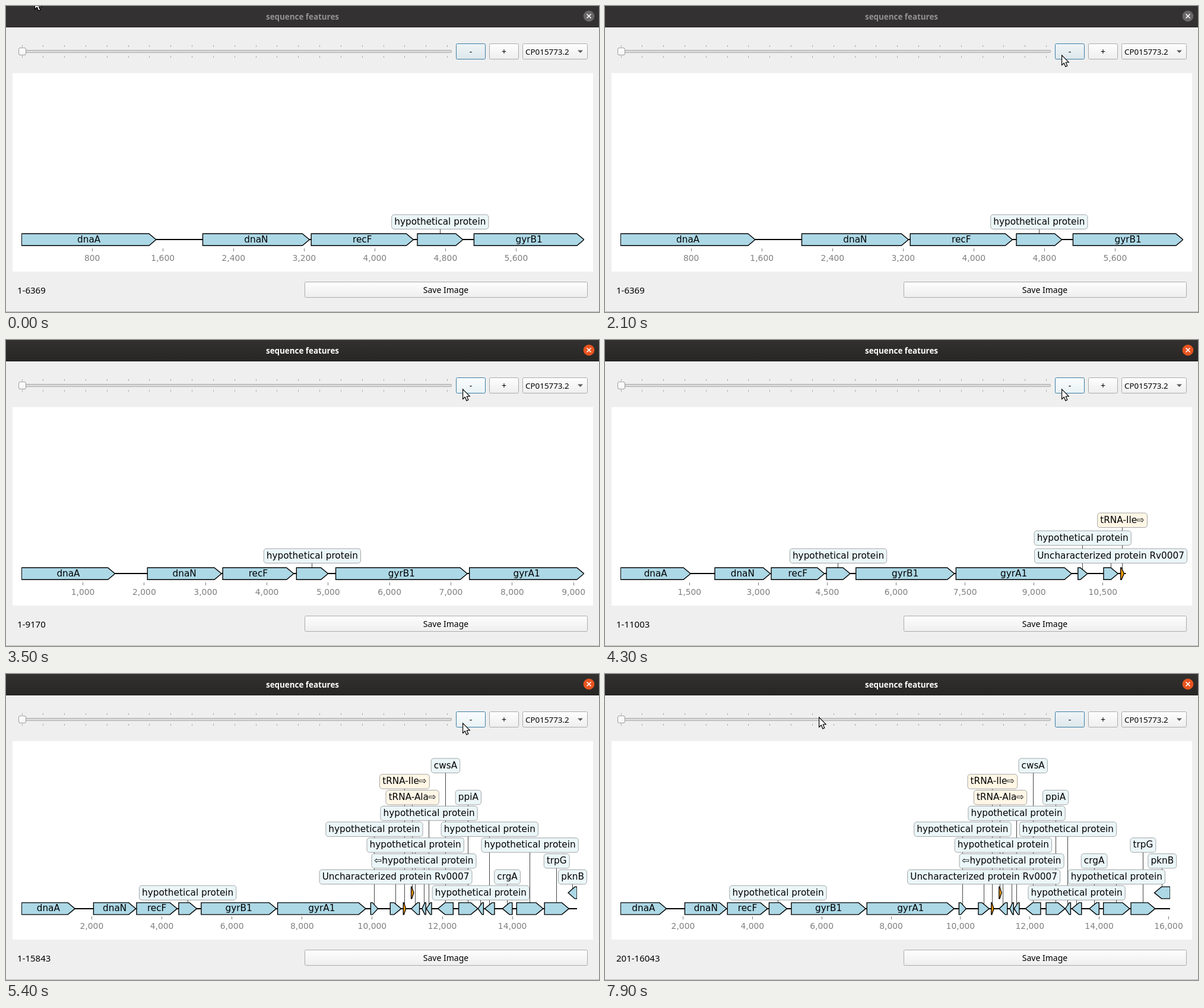
An HTML page with a canvas that plays this animation: 999 px wide and 515 px high, repeating every 8000 ms.

```html
<!DOCTYPE html>
<html lang="en">
<head>
<meta charset="utf-8">
<title>sequence features</title>
<style>
html, body { margin: 0; width: 100%; height: 100%; overflow: hidden; background: #efefef; }
canvas { display: block; }
</style>
</head>
<body>
<canvas id="stage" width="999" height="515"></canvas>
<script>
const ctx = document.getElementById('stage').getContext('2d');
const LOOP = 8000, TICK = 100;
const UI = '"Noto Sans", "Open Sans", sans-serif';
const PLOT = '"DejaVu Sans", sans-serif';
const LEFT = 26.3;
const HYPO = 'hypothetical protein';
const BLUE = { fill: '#add8e6', label: '#ebf6f9' };
const ORANGE = { fill: '#ffa500', label: '#fff6e6' };

// name, first base, last base, strand, lane
const genes = [
  ['dnaA', 1, 1524, 1],
  ['dnaN', 2052, 3260, 1],
  ['recF', 3280, 4437, 1],
  [HYPO, 4482, 4997, 1],
  ['gyrB1', 5123, 7267, 1],
  ['gyrA1', 7302, 9818, 1],
  [HYPO, 9957, 10163, 1],
  ['Uncharacterized protein Rv0007', 10515, 10828, 1],
  ['tRNA-Ile⇨', 10887, 10960, 1],
  ['tRNA-Ala⇨', 11112, 11184, 1, 1],
  [HYPO, 11115, 11350, -1],
  ['⇦' + HYPO, 11420, 11530, -1],
  [HYPO, 11545, 11695, -1],
  ['cwsA', 11874, 12311, -1],
  ['ppiA', 12468, 13016, 1],
  [HYPO, 13020, 13175, -1],
  [HYPO, 13210, 13490, -1],
  ['crgA', 13714, 13995, -1],
  [HYPO, 14120, 14877, 1],
  ['trpG', 14914, 15612, 1],
  ['pknB', 15590, 17470, -1, 1]
];

// rows: label height of each gene, 0 puts the name inside the arrow
const views = [
  { at: 0, from: 1, to: 6369, right: 973.8, base: 393.2, step: 30, rows: '00010' },
  { at: 2900, from: 1, to: 7642, right: 973.7, base: 393.2, step: 30, rows: '000101' },
  { at: 3500, from: 1, to: 9170, right: 973.7, base: 393.2, step: 30, rows: '000100' },
  { at: 4300, from: 1, to: 11003, right: 877.7, base: 393.2, step: 30, rows: '000100213' },
  { at: 4900, from: 1, to: 13203, right: 903.6, base: 393.8, step: 29.6, rows: '0001006287534671' },
  { at: 5400, from: 1, to: 15843, right: 962, base: 394.9, step: 26.75, rows: '000100528743697152432' },
  { at: 7900, from: 201, to: 16043, right: 952, base: 394.9, step: 26.75, rows: '000100528743697513243' }
];

// time, x, y of the pointer tip
const path = [
  [100, 48, -12], [300, 60, 22], [500, 81, 64], [600, 85, 70],
  [1000, 85, 70], [1300, 516, 84], [1400, 610, 87], [1600, 712, 86],
  [1900, 759, 82], [2000, 766, 82], [2100, 769, 82],
  [6900, 769, 82], [7000, 720, 76], [7200, 450, 67], [7300, 370, 65],
  [7400, 370, 65], [7500, 364, 68], [7600, 360, 72]
];
const presses = [2700, 3300, 4700];

function pointerAt(t) {
  if (t <= path[0][0]) return path[0].slice(1);
  const i = path.findIndex(p => p[0] > t);
  if (i < 0) return path[path.length - 1].slice(1);
  const [t0, x0, y0] = path[i - 1], [t1, x1, y1] = path[i];
  const k = (t - t0) / (t1 - t0);
  return [Math.round(x0 + (x1 - x0) * k), Math.round(y0 + (y1 - y0) * k)];
}

function rect(x, y, w, h, color) {
  ctx.fillStyle = color;
  ctx.fillRect(x, y, w, h);
}

function text(str, x, y, font, color = '#000', align = 'center') {
  ctx.font = font;
  ctx.fillStyle = color;
  ctx.textAlign = align;
  ctx.fillText(str, x, y);
}

function polygon(points) {
  ctx.beginPath();
  points.forEach(([x, y]) => ctx.lineTo(x, y));
  ctx.closePath();
}

function vertical(y0, y1, c0, c1) {
  const g = ctx.createLinearGradient(0, y0, 0, y1);
  g.addColorStop(0, c0);
  g.addColorStop(1, c1);
  return g;
}

function panel(x, y, w, h, r, fill, edge, line = 1) {
  ctx.beginPath();
  ctx.roundRect(x, y, w, h, r);
  ctx.fillStyle = fill;
  ctx.fill();
  ctx.strokeStyle = edge;
  ctx.lineWidth = line;
  ctx.stroke();
}

function button(x, y, w, top = '#fefefe', bottom = '#eeeeee', edge = '#ababab') {
  panel(x + .5, y + .5, w - 1, 26, 2, vertical(y, y + 27, top, bottom), edge);
}

function drawTitle(active) {
  rect(0, 0, 999, 36, active ? vertical(0, 36, '#33312f', '#272624') : '#333132');
  rect(0, 35, 999, 1, active ? '#1c1b1a' : '#292728');
  text('sequence features', 499.5, 23, `bold 13.4px ${UI}`, active ? '#fff' : '#949292');
  ctx.beginPath();
  ctx.arc(982, 17, 9.3, 0, 7);
  ctx.fillStyle = active ? '#e95420' : '#696767';
  ctx.fill();
  ctx.beginPath();
  for (const s of [-1, 1]) {
    ctx.moveTo(978.5, 17 - 3.5 * s);
    ctx.lineTo(985.5, 17 + 3.5 * s);
  }
  ctx.strokeStyle = '#fff';
  ctx.lineWidth = 1.6;
  ctx.stroke();
}

function drawSlider() {
  for (let i = 0; i <= 20; i++) {
    const x = Math.floor(27 + i * 35.83);
    rect(x, 66, 1, 3, '#a8a8a8');
    rect(x, 84, 1, 3, '#a8a8a8');
  }
  panel(21.5, 74.5, 729, 4, 1.5, vertical(74, 79, '#cfcfcf', '#e2e2e2'), '#acacac');
  panel(21.5, 70.5, 12, 12, 2.5, vertical(70, 83, '#ffffff', '#f3f3f3'), '#9c9c9c');
}

function drawControls(t) {
  const pressed = presses.some(p => t >= p && t < p + TICK);
  const hover = t >= 2700 && t < 7000;
  const [top, bottom] = pressed ? ['#d3dee3', '#d3dee3']
    : hover ? ['#fbfdfe', '#e8f1f4'] : ['#f0f5f7', '#dce7eb'];
  button(758, 63, 50, top, bottom, '#3c7ea5');
  button(814, 63, 50);
  button(870, 63, 110);
  button(503, 464, 477);
  text('-', 783, 82, `14px ${UI}`);
  text('+', 839, 82, `14px ${UI}`);
  text('CP015773.2', 875, 82, `13.4px ${UI}`, '#000', 'left');
  text('Save Image', 741, 483, `14px ${UI}`);
  polygon([[963, 74.5], [972, 74.5], [967.5, 79]]);
  ctx.fillStyle = '#5a5a5a';
  ctx.fill();
}

// a round step giving at most ten intervals
function tickStep(span) {
  const power = 10 ** Math.floor(Math.log10(span / 10));
  return power * [1, 1.5, 2, 2.5, 3, 4, 5, 6, 8, 10].find(m => span / (m * power) <= 10);
}

function arrow(x0, x1, y, strand, fill) {
  const h = 10, head = Math.min(12, (x1 - x0) * .75);
  const [tail, tip] = strand > 0 ? [x0, x1] : [x1, x0];
  const neck = tip - strand * head;
  polygon([[tail, y - h], [neck, y - h], [tip, y], [neck, y + h], [tail, y + h]]);
  ctx.fillStyle = fill;
  ctx.fill();
  ctx.strokeStyle = '#000';
  ctx.lineWidth = 1.39;
  ctx.stroke();
}

function drawPlot(v) {
  const scale = (v.right - LEFT) / (v.to - v.from);
  const toX = bp => LEFT + (bp - v.from) * scale;
  const step = tickStep(v.to - v.from);
  const font = `15.28px ${PLOT}`;

  rect(11, 113, 978, 334, '#fff');
  for (let bp = step; bp <= v.to; bp += step) {
    const x = toX(bp);
    rect(Math.floor(x), 408, 1, 5, '#808080');
    text(bp.toLocaleString('en-US'), x, 429, `13.89px ${PLOT}`, '#808080');
  }

  const items = [...v.rows].map((row, i) => {
    const [name, first, last, strand, lane = 0] = genes[i];
    const a = toX(Math.max(first, v.from)), b = toX(Math.min(last, v.to));
    return {
      name, strand, a, b, mid: (a + b) / 2, y: v.base - lane * v.step,
      labelY: v.base - row * v.step, inside: row === '0',
      color: name.startsWith('tRNA') ? ORANGE : BLUE
    };
  });
  const tagged = items.filter(g => !g.inside);

  for (const g of tagged) {
    rect(Math.floor(g.mid), g.labelY, 1, g.y - g.labelY, 'rgba(0,0,0,.72)');
  }

  ctx.save();
  ctx.beginPath();
  ctx.rect(26, 113, v.right - 26, 334);
  ctx.clip();
  rect(26, Math.round(v.base) - 1, v.right - 26, 2, '#000');
  for (const g of items) arrow(g.a, g.b, g.y, g.strand, g.color.fill);
  ctx.restore();

  for (const g of items.filter(g => g.inside)) {
    text(g.name, g.mid, Math.round(v.base + 4.5), font);
  }
  for (const g of tagged) {
    ctx.font = font;
    const w = ctx.measureText(g.name).width + 9.2;
    panel(g.mid - w / 2, g.labelY - 12.1, w, 24.4, 4.5, g.color.label, '#808080', .69);
    text(g.name, g.mid, Math.round(g.labelY + 4.5), font);
  }
}

function drawPointer([x, y]) {
  ctx.save();
  ctx.translate(x + .6, y + .9);
  polygon([[0, 0], [0, 16.6], [3.7, 13.2], [6.3, 19.2], [9.2, 17.9], [6.7, 12.1], [11.6, 11.8]]);
  ctx.fillStyle = '#fff';
  ctx.fill();
  ctx.strokeStyle = '#000';
  ctx.lineWidth = 1.2;
  ctx.stroke();
  ctx.restore();
}

function draw(t) {
  const view = views.filter(v => v.at <= t).pop();
  rect(0, 0, 999, 515, '#efefef');
  drawTitle(t >= 2700);
  drawSlider();
  drawControls(t);
  drawPlot(view);
  text(`${view.from}-${view.to}`, 19, 484, `15px ${UI}`, '#000', 'left');
  rect(0, 514, 999, 1, '#b4b4b4');
  drawPointer(pointerAt(t));
}

const start = performance.now();
function loop() {
  const t = (performance.now() - start) % LOOP;
  draw(Math.floor(t / TICK) * TICK);
  requestAnimationFrame(loop);
}
loop();
</script>
</body>
</html>
```
